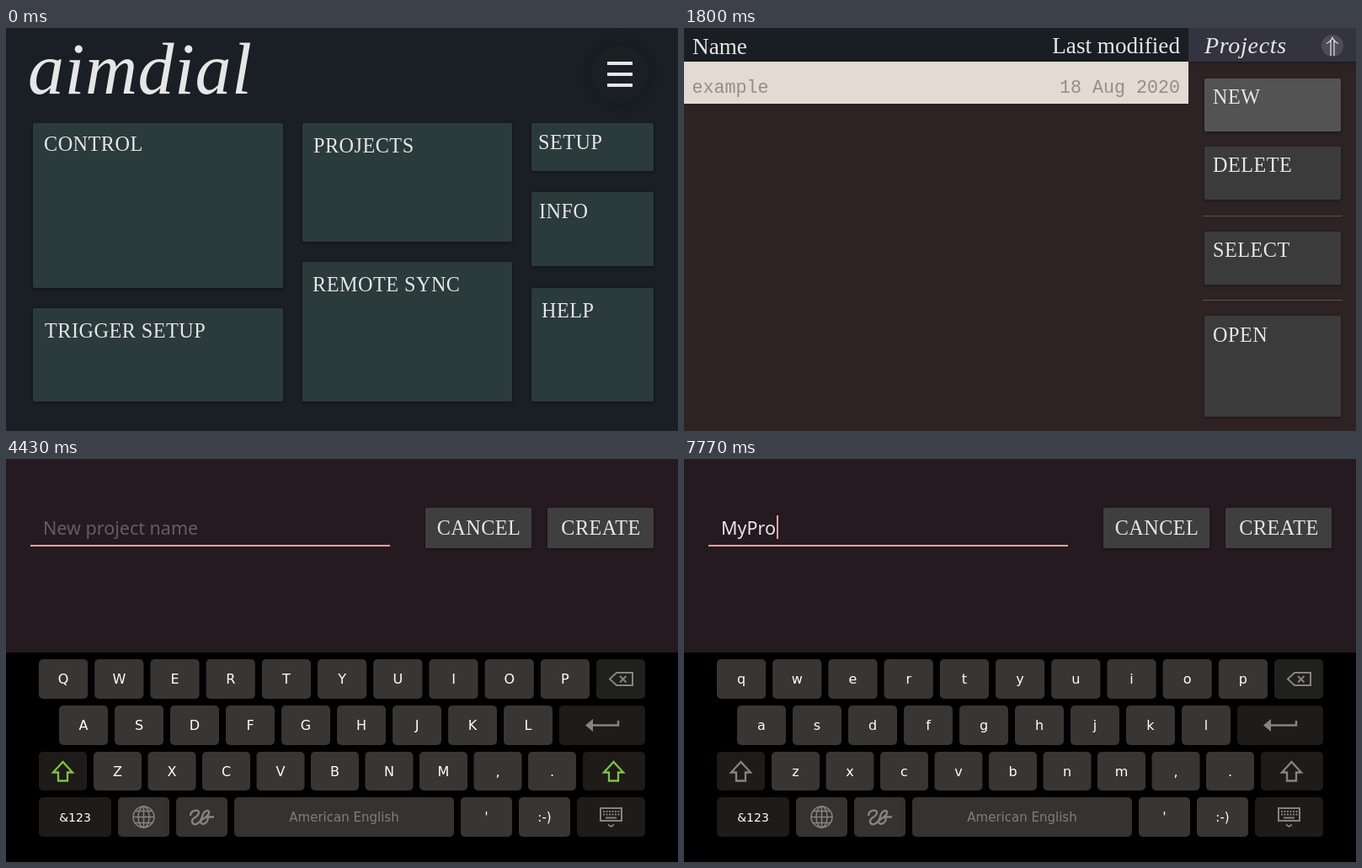
These frames come from a looping animation (798x479 px, 8 s). An HTML page:

```html
<!DOCTYPE html>
<html lang="en">
<head>
<meta charset="utf-8">
<title>Camera control panel</title>
<style>
  html, body { margin: 0; width: 100%; height: 100%; overflow: hidden; background: #191f24; }
  svg { display: block; width: 100vw; height: 100vh; }
  text { white-space: pre; }
  .slab { font: 24.2px "Liberation Serif", serif; letter-spacing: .5px; fill: #e6e6e6; }
  .head { font: 27.2px "Liberation Serif", serif; fill: #e6e6e6; }
  .ital { font: italic 28px "Liberation Serif", serif; letter-spacing: .7px; fill: #e6e6e6; }
  .logo { font: italic 86px "Liberation Serif", serif; letter-spacing: .5px; fill: #e6e6e6; }
  .mono { font: 21.67px "Liberation Mono", monospace; fill: #958e88; }
  .field { font: 21.5px "Noto Sans", sans-serif; }
  .key { font: 16px "DejaVu Sans", sans-serif; fill: #fff; text-anchor: middle; }
  .card { filter: drop-shadow(0 1px 2px rgba(0, 0, 0, .4)); }
  .icon { fill: none; stroke: #868482; stroke-width: 2; }
</style>
</head>
<body>
<svg id="stage" viewBox="0 0 798 479" preserveAspectRatio="none">
  <defs>
    <radialGradient id="halo">
      <stop offset=".62" stop-color="#12171a" stop-opacity=".4"/>
      <stop offset="1" stop-color="#12171a" stop-opacity="0"/>
    </radialGradient>
  </defs>
</svg>
<script>
const LOOP = 8000;
const NS = 'http://www.w3.org/2000/svg';
const stage = document.getElementById('stage');

function add(parent, tag, attrs = {}, content) {
  const el = document.createElementNS(NS, tag);
  for (const name in attrs) el.setAttribute(name, attrs[name]);
  if (content !== undefined) el.textContent = content;
  parent.appendChild(el);
  return el;
}
const group = parent => add(parent, 'g');
const rect = (p, x, y, width, height, fill, rx = 0) => add(p, 'rect', { x, y, width, height, fill, rx });
const label = (p, x, y, cls, s, more = {}) => add(p, 'text', { x, y, class: cls, ...more }, s);
const path = (p, d, more = {}) => add(p, 'path', { d, class: 'icon', ...more });

// A card returns its highlight overlay.
function card(p, x, y, w, h, fill, tx, ty, s, anchor = 'start') {
  rect(p, x, y, w, h, fill, 2).setAttribute('class', 'card');
  const glow = rect(p, x, y, w, h, '#fff', 2);
  glow.setAttribute('opacity', 0);
  label(p, tx, ty, 'slab', s, { 'text-anchor': anchor });
  return glow;
}

const back = rect(stage, 0, 0, 798, 479, '#191f24');

// Home
const home = group(stage);
label(home, 26, 78, 'logo', 'aimdial');
add(home, 'circle', { cx: 729, cy: 55, r: 52, fill: 'url(#halo)' });
add(home, 'circle', { cx: 729, cy: 55, r: 34, fill: '#191f23' });
for (const y of [40, 53, 66]) rect(home, 714, y, 30, 4, '#e6e6e6');
const tile = (...a) => card(home, ...a.slice(0, 4), '#2b3a3b', ...a.slice(4));
tile(32, 113, 297, 196, 45, 146, 'CONTROL');
tile(32, 333, 297, 111, 46, 368, 'TRIGGER SETUP');
const openProjects = tile(352, 113, 249, 141, 365, 148, 'PROJECTS');
tile(352, 278, 249, 166, 364, 313, 'REMOTE SYNC');
tile(624, 113, 145, 57, 632, 144, 'SETUP');
tile(624, 195, 145, 88, 633, 226, 'INFO');
tile(624, 309, 145, 135, 636, 344, 'HELP');

// Project list
const list = group(stage);
rect(list, 599, 0, 199, 40, '#343340').setAttribute('class', 'card');
rect(list, 0, 0, 599, 40, '#191e23');
label(list, 10, 31, 'head', 'Name');
label(list, 589, 30, 'head', 'Last modified', { 'text-anchor': 'end' });
label(list, 618, 30, 'ital', 'Projects');
rect(list, 0, 40, 599, 50, '#e3dad2');
label(list, 9.5, 77, 'mono', 'example');
label(list, 589, 77, 'mono', '18 Aug 2020', { 'text-anchor': 'end' });
add(list, 'circle', { cx: 770, cy: 21, r: 13, fill: '#4e4c55' });
path(list, 'M768 33V14M772 33V14M763 18.500Q768 16 770 11.500Q772 16 777 18.500',
  { style: 'stroke:#e6e6e6;stroke-width:1.2' });
const action = (y, h, s, ty) => card(list, 618, y, 162, h, '#3c3b3c', 628, ty, s);
const newGlow = action(60, 63, 'NEW', 90);
action(141, 63, 'DELETE', 171);
action(242, 63, 'SELECT', 272);
action(342, 120, 'OPEN', 373);
for (const y of [223, 323]) rect(list, 616, y, 166, 1, '#555153');

// New project form
const form = group(stage);
const hint = label(form, 44, 90, 'field', 'New project name', { fill: '#655c61' });
const typed = label(form, 44, 90, 'field', '', { fill: '#e6e6e6' });
const line = rect(form, 29, 103, 427, 1, '#8f888b');
const caret = rect(form, 44, 67, 2, 28, '#f0a09e');
card(form, 498, 58, 126, 48, '#403f40', 561.5, 90, 'CANCEL', 'middle');
card(form, 643, 58, 126, 48, '#403f40', 706.5, 90, 'CREATE', 'middle');

// Keyboard
const board = group(stage);
rect(board, 0, 230, 798, 249, '#000');
const keys = {};
const LIGHT = '#383533', DARK = '#1e1b18';

function key(x, y, w, h, fill, s, more = {}) {
  const g = group(board);
  rect(g, x, y, w, h, fill, 5);
  const text = s && label(g, x + w / 2, y + h / 2 + 5.5, 'key', s, more);
  return { g, text, x, y };
}
function row(chars, x, y, step, w, h) {
  [...chars].forEach((c, i) => { keys[c] = key(x + i * step, y, w, h, LIGHT, c); });
}
row('QWERTYUIOP', 39, 238, 66.2, 58.2, 47);
row('ASDFGHJKL', 63, 293, 66, 58, 47);
row('ZXCVBNM,.', 104, 348, 64.5, 57, 46);
key(701, 238, 58, 47, '#20211c');
key(657, 293, 102, 47, DARK);
key(39, 348, 57, 46, DARK);
key(685, 348, 74, 46, DARK);
key(39, 402, 86, 47, DARK, '&123', { style: 'font-size:14px' });
key(133, 402, 61, 47, '#35322f');
key(202, 402, 61, 47, '#35322f');
key(271, 402, 261, 47, '#35322f', 'American English', { style: 'font-size:15px;fill:#807d7a' });
key(540, 402, 61, 47, LIGHT, "'");
key(609, 402, 61, 47, LIGHT, ':-)', { style: 'font-size:15px' });
key(678, 402, 81, 47, DARK);

path(board, 'M717 261.500L725 254H744V269H725ZM729 258L736.500 265.500M736.500 258L729 265.500');
path(board, 'M696 316.500H727V311', { style: 'stroke-width:2.500' });
path(board, 'M688 316.500L697 309V324Z', { style: 'fill:#868482;stroke:none' });
const shifts = [67.5, 721.5].map(x =>
  path(board, `M${x} 360L${x - 11.5} 372.500H${x - 5.5}V382.500H${x + 5.5}V372.500H${x + 11.5}Z`,
    { style: 'stroke-width:2.300' }));

const globe = { class: 'icon', style: 'stroke-width:1.500' };
add(board, 'circle', { cx: 163.5, cy: 425.5, r: 12.5, ...globe });
add(board, 'ellipse', { cx: 163.5, cy: 425.5, rx: 6.5, ry: 12.5, ...globe });
path(board, 'M163.500 413V438M151 425.500H176M153.500 418.500H173.500M153.500 432.500H173.500', globe);
path(board, 'M219 424C219 417 229 416 229 420C229 426 220 426 221 431C222 437 231 434 233 425' +
  'C235 417 242 416 241 421C239 427 230 428 231 432C234 437 242 430 239 425.500H247', { style: 'stroke-width:2.400' });
rect(board, 706, 415, 25, 15, 'none').setAttribute('class', 'icon');
for (const y of [419, 422.5]) path(board, `M709 ${y}H729`, { 'stroke-dasharray': '2 1.500' });
path(board, 'M712 426.500H725M715 434.500L718.500 437L722 434.500', { style: 'stroke-width:1.800' });

const bubble = group(stage);
rect(bubble, 0, 0, 66, 55, '#5d5b59', 5);
const bubbleText = label(bubble, 33, 37, 'key', '', { style: 'font-size:25px' });

// Character, press time, release time
const presses = [
  ['M', 4700, 4800], ['y', 5230, 5300], ['P', 6330, 6400], ['r', 6900, 7000], ['o', 7670, 7770]
];
const caretOn = [[3830, 4430], [4800, 5800], [6400, 6900], [7000, LOOP]];

const ramp = (t, a, b) => Math.min(1, Math.max(0, (t - a) / (b - a)));
const mix = (a, b, k) => a.map((v, i) => v + (b[i] - v) * k);
const show = (el, on) => el.setAttribute('visibility', on ? 'visible' : 'hidden');
const fade = (el, k) => {
  el.setAttribute('opacity', k);
  el.setAttribute('display', k > 0 ? 'inline' : 'none');
};

function draw(t) {
  const warm = mix([25, 31, 36], [45, 35, 36], ramp(t, 1080, 1300));
  back.setAttribute('fill', `rgb(${mix(warm, [37, 26, 32], ramp(t, 2200, 2500)).map(Math.round)})`);

  fade(home, 1 - ramp(t, 1080, 1200));
  fade(list, ramp(t, 1080, 1300) * (1 - ramp(t, 2190, 2690)));
  fade(form, ramp(t, 2200, 3070));
  fade(openProjects, .125 * ramp(t, 710, 870));
  fade(newGlow, .12 * ramp(t, 1650, 1800) * (1 - ramp(t, 2200, 2700)));

  const focus = t >= 3370;
  show(board, focus);
  line.setAttribute('y', focus ? 102 : 103);
  line.setAttribute('height', focus ? 2 : 1);
  line.setAttribute('fill', focus ? '#f0a09e' : '#8f888b');

  const value = presses.filter(p => t >= p[2]).map(p => p[0]).join('');
  typed.textContent = value;
  show(hint, !value);
  const end = value ? typed.getComputedTextLength() + .6 : 0;
  caret.setAttribute('x', Math.round(44 + end));
  show(caret, caretOn.some(([a, b]) => t >= a && t < b));

  const upper = t < 4800 || (t >= 5900 && t < 6400);
  for (const s of shifts) s.style.stroke = upper ? '#80c342' : '#868482';
  const down = presses.find(p => t >= p[1] && t < p[2]);
  const held = down && down[0].toUpperCase();
  for (const c in keys) {
    keys[c].text.textContent = upper ? c : c.toLowerCase();
    keys[c].g.setAttribute('opacity', c === held ? .75 : 1);
  }
  show(bubble, !!held);
  if (held) {
    bubble.setAttribute('transform', `translate(${keys[held].x - 4} ${keys[held].y - 65})`);
    bubbleText.textContent = down[0];
  }
}

const start = performance.now();
function tick() {
  draw((performance.now() - start) % LOOP);
  requestAnimationFrame(tick);
}
draw(0);
requestAnimationFrame(tick);
</script>
</body>
</html>
```
